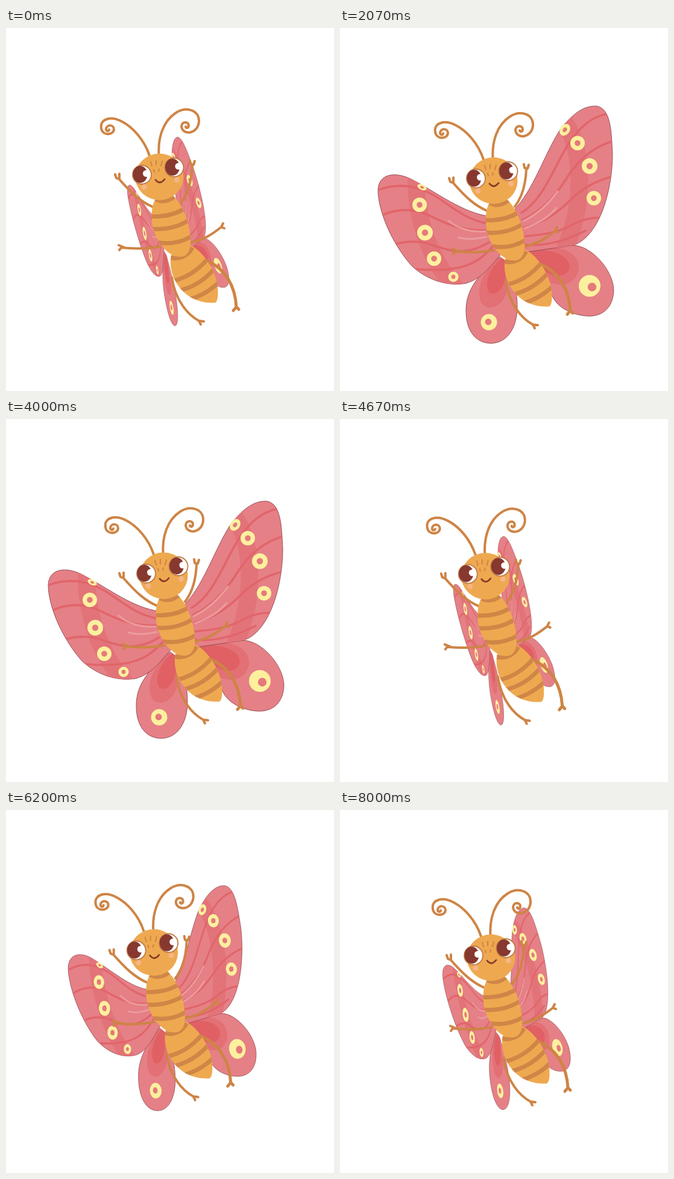
Write an HTML page that moves like this. It is 544 px wide and 600 px high and loops after 8070 ms.

```html
<!DOCTYPE html>
<html lang="en">
<head>
<meta charset="utf-8">
<title>Butterfly</title>
<style>
html, body { margin: 0; width: 100%; height: 100%; overflow: hidden; background: #fff; }
svg { display: block; width: 544px; height: 600px; fill: none; stroke-linecap: round; stroke-linejoin: round; }
.wing { fill: #e58086; stroke: #8c474d; stroke-width: .9; }
.band { stroke: #e27379; stroke-width: 29; }
.vein { stroke: #e1656a; stroke-width: 3.6; }
.shine { stroke: #eb9c9f; stroke-width: 3; }
.mid { fill: #e37075; }
.deep { fill: #e06064; }
.limb { stroke: #ce8445; stroke-width: 4; }
.skin { fill: #eea950; }
.stripe { stroke: #cf8647; stroke-width: 7; stroke-linecap: butt; }
.cream { fill: #fcf09e; }
.core { fill: #e5797c; }
.eye { fill: #fff; stroke: #c07a43; stroke-width: 1.8; }
.pupil { fill: #87382f; }
.cheek { fill: #f5b586; }
</style>
</head>
<body>
<svg viewBox="0 0 544 600">
  <defs>
    <clipPath id="clipL"><path id="upL" d="M245 318C200 312 160 280 118 258C92 244 60 245 60 276C61 312 84 364 116 400C142 424 176 434 205 429C235 421 250 395 272 372Z"/></clipPath>
    <clipPath id="clipR"><path id="upR" d="M285 308C318 275 336 215 362 175C385 145 405 134 424 136C446 142 447 175 449 215C449 270 430 350 384 366L300 378Z"/></clipPath>
    <clipPath id="clipA"><path id="abdomen" d="M271 388C266 414 278 441 300 456C315 466 332 468 344 467C349 464 349 452 348 440C345 418 330 388 305 373Z"/></clipPath>
    <clipPath id="clipT"><path id="thorax" d="M246 294C256 290 268 289 275 291C293 308 305 345 303 372C301 388 292 392 283 391C264 389 246 366 240 340C237 320 239 304 246 294Z"/></clipPath>
  </defs>
  <g id="bug">
    <g id="left">
      <path class="wing" d="M262 385C225 415 206 440 206 474C206 510 224 528 248 528C276 527 291 500 291 468C291 440 285 425 275 395Z"/>
      <path class="mid" d="M262 386C232 410 222 440 231 460C241 476 263 470 273 446L276 396Z"/>
      <path class="deep" d="M266 387C246 402 236 428 243 442C251 453 268 440 271 420L274 393Z"/>
      <use href="#upL" class="wing"/>
      <g clip-path="url(#clipL)">
        <path class="band" d="M124 252C121 310 141 383 188 436"/>
        <path class="vein" d="M242 330C198 322 178 296 148 281C120 266 90 264 62 274M242 341C200 344 168 328 146 317C118 304 92 306 70 315M244 361C210 382 184 377 158 368C132 358 112 358 88 364M252 366C226 396 200 412 120 405"/>
        <path class="shine" d="M238 343C212 345 190 337 177 325M240 352C222 356 207 357 193 353"/>
      </g>
      <g id="spotsL"></g>
    </g>
    <g id="right">
      <path class="wing" d="M303 372C330 366 360 366 384 366C412 366 450 405 451 440C450 470 432 483 410 483C380 482 350 466 346 440Z"/>
      <path class="mid" d="M300 371C350 362 395 372 393 405C388 432 362 436 342 426Z"/>
      <path class="deep" d="M300 374C340 371 374 378 378 400C377 419 352 421 334 407Z"/>
      <use href="#upR" class="wing"/>
      <g clip-path="url(#clipR)">
        <path class="band" d="M366 158C400 200 405 292 370 372"/>
        <path class="vein" d="M298 312C332 292 348 246 368 212C386 178 412 151 446 148M300 324C338 306 360 276 376 250C396 220 420 202 452 193M302 337C340 326 360 310 378 292C400 270 424 258 450 252M304 351C342 348 366 342 386 330C402 322 416 320 430 320M304 365C336 368 372 358 404 342"/>
        <path class="shine" d="M301 326C326 314 344 296 358 277M303 338C330 328 344 318 356 304"/>
      </g>
      <g id="spotsR"></g>
    </g>
    <g class="limb">
      <path d="M235 224C226 197 207 177 190 168C170 157 152 164 155 179C157 191 174 191 176 181C176 172 164 172 163 180C163 184 168 184 168 181"/>
      <path d="M250.500 222C249 195 257 167 279 153C297 142 318 149 317 168C315 189 290 191 288 176C288 167 300 167 300 174C300 179 295 179 295 176"/>
      <path d="M241 309C220 300 205 286 184 262M178 255L180 261L185 263L185 254"/>
      <path d="M287 302C300 285 305 265 306 240M302 232L303 238L308 239L310 233"/>
      <path d="M252 374C228 379 208 378 188 376M194 376L184 372M188 376L185 380"/>
      <path d="M301 368C325 364 340 353 354 342M357 336L354 342L359 344"/>
      <path d="M272 425C278 465 300 488 317 497M325 498L317 497L320 503"/>
      <path stroke-width="5" d="M331 398C362 412 377 440 379 474M374 480L379 474L383 478"/>
    </g>
    <use href="#abdomen" class="skin"/>
    <g class="stripe" clip-path="url(#clipA)">
      <path d="M268 392C284 397 299 390 306 376M268 432C294 428 316 413 332 394M280 448C306 443 329 428 346 407M296 463C320 457 338 446 352 431"/>
    </g>
    <use href="#thorax" class="skin"/>
    <g class="stripe" clip-path="url(#clipT)">
      <path d="M245 296C256 302 268 299 277 291M236 324C260 326 281 320 297 309M237 345C263 347 286 341 304 328M242 366C266 372 288 368 307 356"/>
    </g>
    <ellipse class="skin" cx="251.500" cy="259" rx="40" ry="38.500"/>
    <g id="eyes"></g>
    <path stroke="#cf8445" stroke-width="2" d="M237 234L239 241M246 232L246 239M256 233L254 241M242 247L243 251M251 246L250 250"/>
    <path stroke="#883b2b" stroke-width="2.800" d="M245 264Q252 273 260 263"/>
    <circle class="cheek" cx="226" cy="276" r="4.500"/>
    <circle class="cheek" cx="280.500" cy="264" r="4.500"/>
  </g>
</svg>
<script>
const $ = id => document.getElementById(id);
const oval = (cls, x, y, rx, ry = rx, turn = 0) =>
  `<ellipse class="${cls}" cx="${x}" cy="${y}" rx="${rx}" ry="${ry}" transform="rotate(${turn} ${x} ${y})"/>`;
const spot = ([x, y, rx, ry = rx, turn = 0, shift = 0]) =>
  oval("cream", x, y, rx, ry, turn) + oval("core", x + shift, y + shift / 2, rx * .4, ry * .4, turn);
const eye = ([x, y]) =>
  oval("eye", x, y, 15.5) + oval("pupil", x - 3, y - .5, 12, 14) + `<circle fill="#fff" cx="${x + 7}" cy="${y - 2}" r="5.5"/>`;

$("spotsL").innerHTML = [[133, 270, 8, 4.5, 25], [129, 299, 12], [138, 345, 13], [153, 388, 12],
  [185, 418, 8.5], [244, 493, 13.5, 13.5, 0, -1]].map(spot).join("");
$("spotsR").innerHTML = [[370, 175, 8, 10.5, 35], [391, 197, 12], [411, 235, 13], [418, 288, 12],
  [411, 433, 18, 18, 0, 4]].map(spot).join("");
$("eyes").innerHTML = [[222.5, 255.5], [276, 243.5]].map(eye).join("");

// Drift of the whole insect: step, x, y
const path = [[0, 0, 0], [3.5, 6.5, -2], [10.5, 4.5, 2], [18, -3, 13], [24.5, 0, 14], [31.5, 0, 6], [39, 0.5, 9],
  [43, 1.5, 24], [46, 2, 31], [52.5, 5, 38], [60, 7, 13], [66.5, 0, 14], [73.5, -25, 14], [81, -21, 21],
  [87.5, -10, 2], [94.5, -9, -10], [101.5, -4, 22], [104, -2, 28], [108.5, -2, 23], [115.5, -6, 0], [120, -4, -2]];

function drift(n, axis) {
  const last = path.length - 1;
  const i = Math.min(path.findLastIndex(p => p[0] <= n), last - 1);
  const slope = k => {
    const a = path[Math.max(k - 1, 0)], b = path[Math.min(k + 1, last)];
    return (b[axis] - a[axis]) / (b[0] - a[0]);
  };
  const a = path[i], b = path[i + 1], w = b[0] - a[0], t = (n - a[0]) / w, s = 1 - t;
  return a[axis] * s * s * (1 + 2 * t) + b[axis] * t * t * (3 - 2 * t)
    + w * t * s * (slope(i) * s - slope(i + 1) * t);
}

function fold(id, x, y, turn, narrow, shorten) {
  $(id).setAttribute("transform",
    `translate(${x} ${y}) rotate(${-turn}) scale(${1 - narrow} ${1 - shorten}) translate(${-x} ${-y})`);
}

const LOOP = 8070, STEP = 1000 / 15, BEAT = 7;
const start = performance.now();

function draw(now) {
  const time = Math.max(0, now - start) % LOOP;
  const n = Math.min(120, Math.floor((time + 5) / STEP));
  const shut = 1 - (1 - Math.cos(2 * Math.PI * n / BEAT)) / 1.901;
  $("bug").setAttribute("transform", `translate(${drift(n, 1) + 3} ${drift(n, 2) - 13})`);
  fold("left", 255, 367, 10 * shut, .785 * shut, .13 * shut);
  fold("right", 302, 378, 18.5 * shut, .675 * shut, .25 * shut);
  requestAnimationFrame(draw);
}
draw(start);
</script>
</body>
</html>
```
